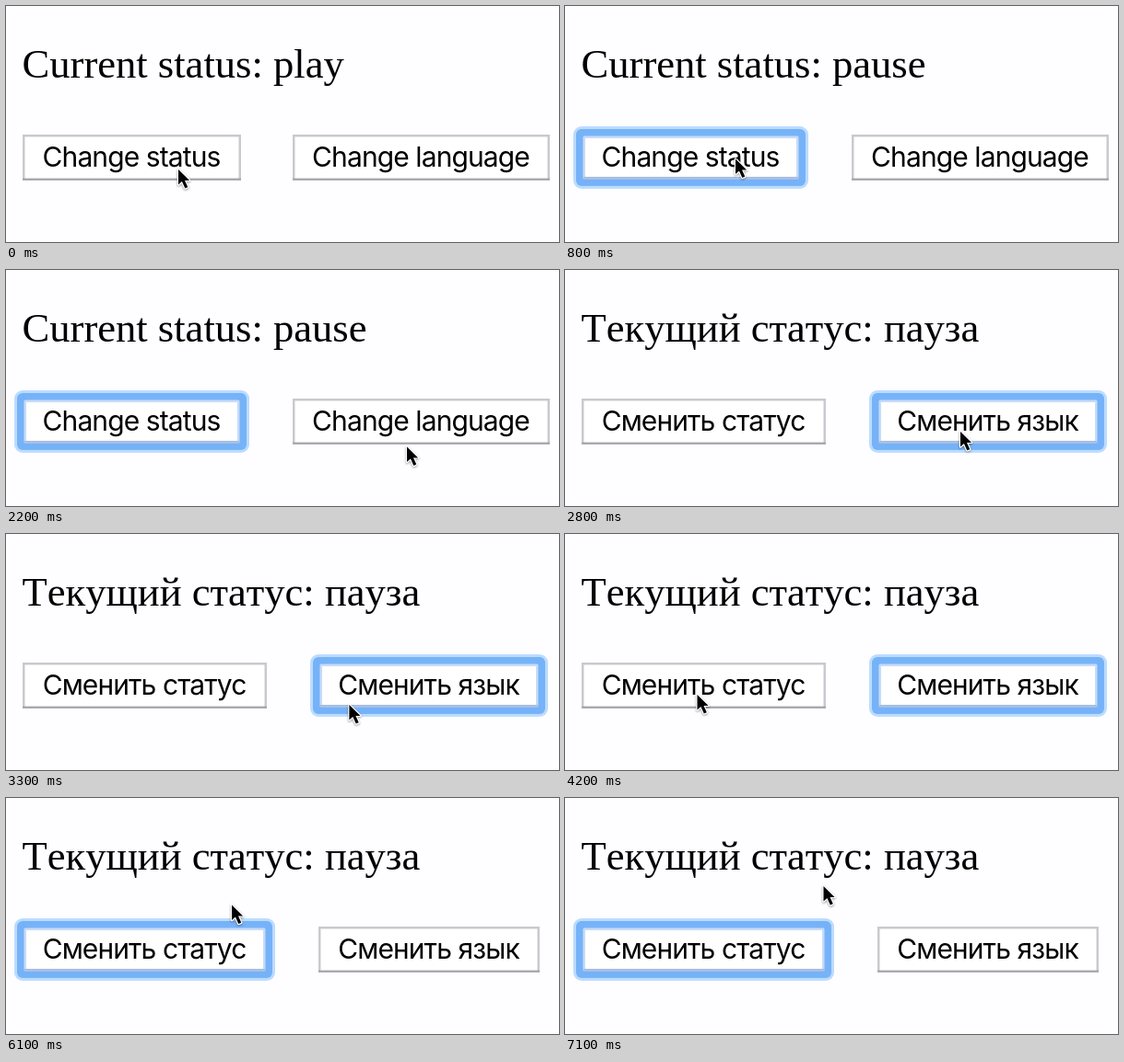
Write an HTML page that moves like this. It is 600 px wide and 257 px high and loops after 7.4 s.

```html
<!DOCTYPE html>
<html lang="en">
<head>
<meta charset="utf-8">
<title>Status and language buttons</title>
<style>
  html, body { margin: 0; width: 100%; height: 100%; overflow: hidden; background: #fefdff; }
  svg { display: block; width: 600px; height: 257px; }
  #status { font: 44.6px "Liberation Serif", "Times New Roman", serif; font-kerning: none; }
  .label { font: 30px Inter, Roboto, sans-serif; letter-spacing: -0.03em; text-anchor: middle; }
  #cursor { filter: drop-shadow(0 1.5px 1.2px rgba(0, 0, 0, .4)); }
</style>
</head>
<body>
<svg viewBox="0 0 600 257">
  <text id="status" x="17.5" y="78.3"></text>
  <g id="buttons"></g>
  <path id="cursor" d="M1 2V18.6L4.9 15L8.3 22.6L11.3 21.3L8 13.9H13.1Z"
        stroke="#fff" stroke-width="2.4" stroke-linejoin="round" paint-order="stroke"/>
</svg>
<script>
const LOOP = 7400, STEP = 100;
const LEFT = 18, TOP = 140, HEIGHT = 50, GAP = 56, BORDER = 2.5;

const languages = {
  en: {
    prefix: 'Current status: ', play: 'play', pause: 'pause',
    buttons: [{ w: 237, text: 'Change status' }, { w: 279, text: 'Change language' }]
  },
  ru: {
    prefix: 'Текущий статус: ', play: 'играет', pause: 'пауза',
    buttons: [{ w: 265, text: 'Сменить статус' }, { w: 240, text: 'Сменить язык' }]
  }
};

// A button takes focus when pressed and acts when released one step later.
const STATUS = 0, LANGUAGE = 1;
const clicks = [
  { at: 200, button: STATUS }, { at: 1000, button: STATUS }, { at: 1400, button: STATUS },
  { at: 2600, button: LANGUAGE },
  { at: 4400, button: STATUS }, { at: 4900, button: STATUS }
];

const home = { x: 186, y: 176 };
const moves = [
  { from: 0, to: 200, x: 184, y: 164.5 },
  { from: 1600, to: 2200, x: 434, y: 190.5 },
  { from: 2200, to: 2500, x: 428, y: 174 },
  { from: 2940, to: 4200, x: 142.5, y: 173, sag: 30 },
  { from: 5900, to: 6200, x: 279.5, y: 94 }
];

const byId = id => document.getElementById(id);
const clamp = v => Math.min(1, Math.max(0, v));
const smooth = k => k * k * (3 - 2 * k);

function pointerAt(t) {
  let { x, y } = home;
  for (const move of moves) {
    const k = smooth(clamp((t - move.from) / (move.to - move.from)));
    x += (move.x - x) * k;
    y += (move.y - y) * k + (move.sag || 0) * Math.sin(Math.PI * k) ** 2;
  }
  return [x, y];
}

function box(x, w, grow, radius, fill) {
  return `<rect x="${x - grow}" y="${TOP - grow}" width="${w + 2 * grow}" height="${HEIGHT + 2 * grow}" rx="${radius}" fill="${fill}"/>`;
}

function drawButton({ w, text }, x, focused, pressed) {
  const inset = focused ? 1.5 : 0;
  const [light, dark] = focused ? ['#c6dcf7', '#a9bfe0'] : ['#cac9cf', '#a9a8ae'];
  const ring = focused ? box(x, w, 9, 9, '#bbdcfd') + box(x, w, 6, 6, '#76b2f8') : '';
  const edgeY = pressed ? TOP + inset : TOP + HEIGHT - inset - BORDER;
  return ring + box(x, w, -inset, inset, light) +
    `<rect x="${x + inset}" y="${edgeY}" width="${w - 2 * inset}" height="${BORDER}" fill="${dark}"/>` +
    box(x, w, -inset - BORDER, 0, '#fff') +
    `<text class="label" x="${x + w / 2 - 0.5}" y="175">${text}</text>`;
}

function render(t) {
  const released = clicks.filter(c => c.at + STEP <= t).map(c => c.button);
  const latest = clicks.filter(c => c.at <= t).pop();
  const paused = released.filter(b => b === STATUS).length % 2;
  const lang = languages[released.includes(LANGUAGE) ? 'ru' : 'en'];

  byId('status').textContent = lang.prefix + (paused ? lang.pause : lang.play);
  let x = LEFT;
  byId('buttons').innerHTML = lang.buttons.map((button, i) => {
    const focused = latest?.button === i;
    const markup = drawButton(button, x, focused, focused && t < latest.at + STEP);
    x += button.w + GAP;
    return markup;
  }).join('');
  byId('cursor').setAttribute('transform', `translate(${pointerAt(t)})`);
}

const start = performance.now();
let shown = -1;
function tick() {
  const t = Math.floor((performance.now() - start) % LOOP / STEP) * STEP;
  if (t !== shown) render(shown = t);
  requestAnimationFrame(tick);
}
tick();
</script>
</body>
</html>
```
